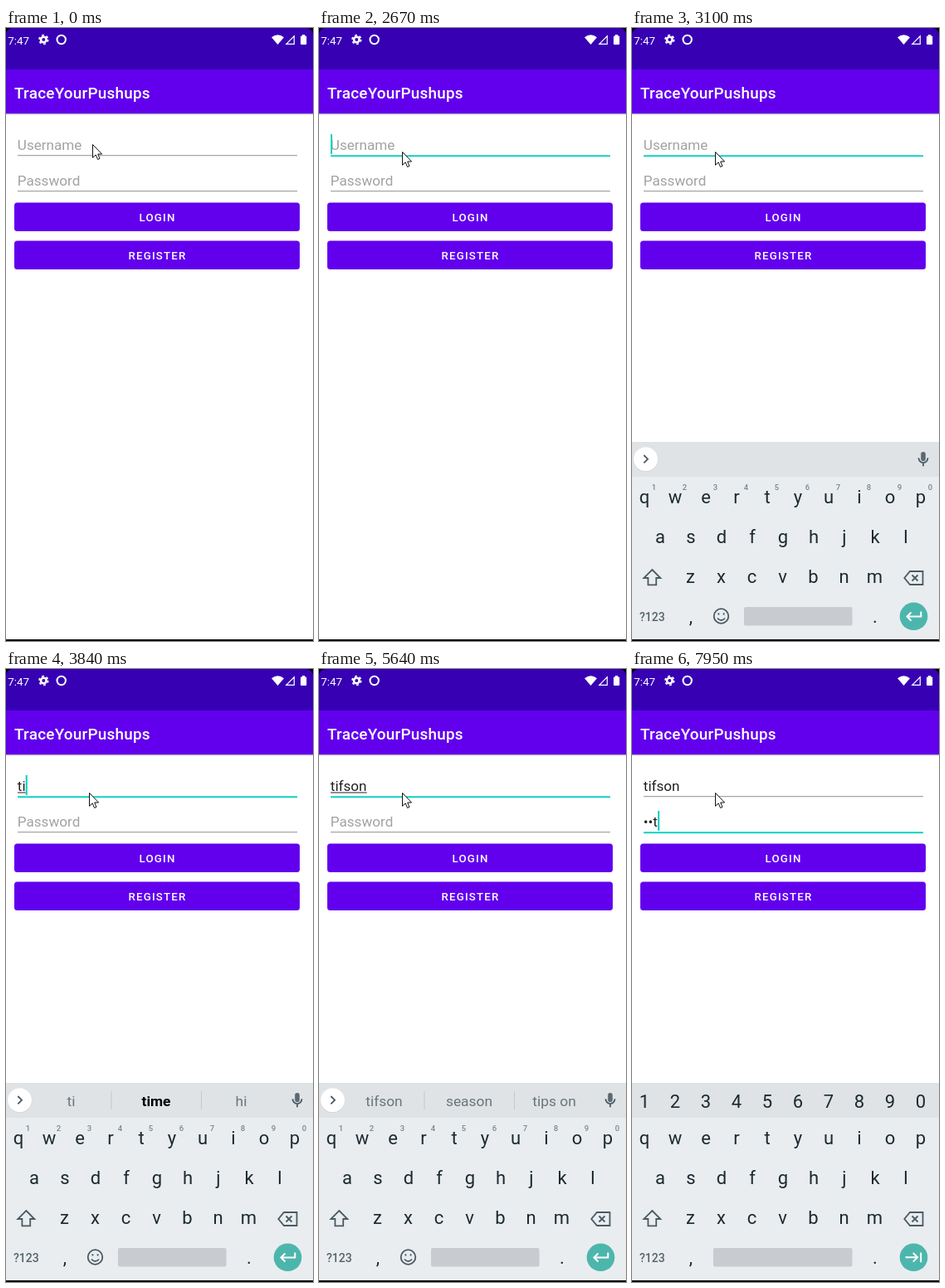
Recreate the animation shown at these times as an HTML page. Size 370 by 739 pixels, loop 8000 ms.

```html
<!DOCTYPE html>
<html lang="en">
<head>
<meta charset="utf-8">
<title>Login form</title>
<style>
  html, body { margin: 0; width: 100%; height: 100%; overflow: hidden; background: #fff; }
  svg { display: block; width: 370px; height: 739px; font-family: Roboto, sans-serif; }
  text { white-space: pre; font-variant-ligatures: none; }
  .mid { text-anchor: middle; }
  .title { font: 500 18.9px Roboto, sans-serif; letter-spacing: .0125em; fill: #fff; }
  .btn { font: 500 13.25px Roboto, sans-serif; letter-spacing: .0893em; fill: #fff; }
  .field { font-size: 17.1px; fill: #212121; }
  .hint { fill: #a2a2a2; }
  .key { font-size: 22px; fill: #1c2a30; }
  .small { font: 500 9.5px Roboto, sans-serif; fill: #7b868c; }
  .word { font-size: 17.4px; fill: #6a757b; }
  .word.bold { font-weight: 700; fill: #000; }
  .line { fill: none; stroke: #4a5a62; stroke-width: 1.8; }
  .white { fill: none; stroke: #fff; stroke-width: 2; }
</style>
</head>
<body>
<svg viewBox="0 0 370 739">
  <rect width="370" height="739" fill="#fff"/>
  <rect y="103" width="370" height="1" fill="#b4a8c4"/>
  <rect y="104" width="370" height="1" fill="#ececec"/>
  <rect width="370" height="50" fill="#3700b3"/>
  <rect y="50" width="370" height="53" fill="#6200ee"/>
  <path d="M0 0H8A8 8 0 0 0 0 8ZM370 0H362A8 8 0 0 1 370 8Z"/>

  <g fill="#fff">
    <text x="2.3" y="19.5" font-size="13.4">7:47</text>
    <path d="M320 11.3Q327.5 5.2 335 11.3L327.5 20Z"/>
    <rect x="355" y="9.5" width="7.2" height="10.5" rx="1"/>
    <rect x="357" y="8" width="3.2" height="2"/>
  </g>
  <g fill="none" stroke="#fff">
    <circle cx="45.3" cy="14" r="3.3" stroke-width="2.6"/>
    <circle cx="45.3" cy="14" r="5.3" stroke-width="1.8" stroke-dasharray="2.77"/>
    <circle cx="66.7" cy="14" r="5.2" stroke-width="2"/>
    <path d="M347.3 9.8V19.3H337.8Z" stroke-width="1.2"/>
  </g>

  <text class="title" x="10" y="84.5">TraceYourPushups</text>
  <g fill="#6200ee">
    <rect x="10" y="210.5" width="344" height="34.5" rx="3.5"/>
    <rect x="10" y="256.5" width="344" height="34.5" rx="3.5"/>
  </g>
  <text class="btn mid" x="182.5" y="233">LOGIN</text>
  <text class="btn mid" x="182.5" y="279">REGISTER</text>

  <g id="user"></g>
  <g id="pass"></g>
  <rect y="737" width="370" height="2"/>

  <g id="board">
    <rect y="499" width="370" height="238" fill="#e9edf0"/>
    <rect y="499" width="370" height="42" fill="#dfe3e6"/>
    <g id="keys"></g>
    <path class="line" d="M24.3 653L34.3 663H29.2V671.3H19.4V663H14.3Z"/>
    <path class="line" d="M335 655H350.5V671H335L328.3 663ZM337.5 659.5L344.5 666.5M344.5 659.5L337.5 666.5"/>
    <text x="9" y="714.5" font-size="14" font-weight="500" fill="#56646b">?123</text>
    <rect id="space" y="698" height="22.5" rx="2" fill="#c8ccd0"/>
    <circle cx="339.5" cy="709.3" r="16.8" fill="#4db6ac"/>
    <g id="textMode">
      <circle cx="16.5" cy="520.3" r="14.8" fill="#cfd3d6"/>
      <circle cx="16.5" cy="519.7" r="14.5" fill="#fff"/>
      <path class="line" d="M14.3 515L19 519.7L14.3 524.4"/>
      <g id="words"></g>
      <rect x="348.2" y="511" width="5.6" height="11" rx="2.8" fill="#5b6a72"/>
      <path class="line" stroke-width="1.5" d="M345.5 518.3a5.5 5.8 0 0 0 11 0M351 524V528.3"/>
      <circle class="line" cx="107.5" cy="709" r="8.8"/>
      <path class="line" d="M103 711.5Q107.5 716.5 112 711.5M104.4 705.2v2.4M110.6 705.2v2.4"/>
      <path class="white" d="M348.3 703.5V709.5H331.5M336.5 704.5L331.5 709.5L336.5 714.5"/>
    </g>
    <g id="passMode">
      <path class="white" d="M329.5 709.3H344M338.8 704L344.1 709.3L338.8 714.6M348.2 703.5V715.2"/>
    </g>
  </g>

  <path id="pointer" d="M.5 .5V16.3L4.2 12.9L6.6 18.5L9 17.4L6.7 12H11.6Z" fill="#fff" stroke="#111"/>
</svg>
<script>
const LOOP = 8000;
const $ = id => document.getElementById(id);
const label = (cls, x, y, s) => `<text class="${cls}" x="${x}" y="${y}">${s}</text>`;

// Each list holds [start time, value]; the latest started value applies.
const at = (list, t) => list.reduce((v, [start, next]) => t >= start ? next : v, null);

const pointer = [[0, [104, 140]], [1390, [104, 143]], [1540, [100, 149]]];
const userText = [[0, ''], [3400, 't'], [3690, 'ti'], [3990, 'tif'], [4290, 'tifs'],
  [4690, 'tifso'], [5060, 'tifson']];
const passText = [[0, ''], [7360, 'f'], [7800, '•i'], [7950, '••t']];
const focus = [[0, ''], [2280, 'user'], [6010, 'pass']];
const caret = [[0, false], [2400, true], [3100, false], [3400, true], [5640, false],
  [6010, true], [6470, false], [7060, true]];
const words = [[0, []], [3400, ['t', 'the', 'today']], [3840, ['ti', '*time', 'hi']],
  [3990, ['tif', 'if', 'tiff']], [4290, ['tifs', 'tiffs', 'tips']],
  [4690, ['tifso', 'tiffs', 'tiles']], [5060, ['tifson', 'season', 'tips on']]];
const board = [[0, null], [2980, [13, .85]], [3100, [0, 1]]];
const mode = [[0, 'text'], [6160, 'pass']];

function drawField(id, top, hint, text, focused, caretOn, composing) {
  const g = $(id), base = top + 19;
  const rule = focused
    ? `<rect x="14" y="${top + 25.3}" width="337" height="1.9" fill="#03cfc0"/>`
    : `<rect x="14" y="${top + 25.2}" width="337" height="1" fill="#8f8f8f"/>`;
  g.innerHTML = rule + label(text ? 'field' : 'field hint', 13.8, base, text || hint);
  const w = text ? g.querySelector('text').getComputedTextLength() : 0;
  let extra = '';
  if (composing && text) extra += `<rect x="14" y="${base + 1.5}" width="${w}" height="1" fill="#212121"/>`;
  if (focused && caretOn) extra += `<rect x="${14 + w}" y="${top}" width="2" height="24" fill="#03cfc0"/>`;
  g.insertAdjacentHTML('beforeend', extra);
}

function drawKeys(isPass) {
  const row = (s, x, y) => [...s].map((c, i) => label('key mid', x + i * 37, y, c)).join('');
  const digits = '1234567890';
  $('keys').innerHTML = row('qwertyuiop', 15, 572.5) + row('asdfghjkl', 34, 620.5) +
    row('zxcvbnm', 70.5, 668.5) + row(',', 71, 716.5) + row('.', 293, 716.5) +
    (isPass ? row(digits, 15, 528.5)
      : [...digits].map((c, i) => label('small mid', 26.5 + i * 37, 557, c)).join(''));
  $('space').setAttribute('x', isPass ? 98 : 135);
  $('space').setAttribute('width', isPass ? 167.5 : 130.5);
  $('textMode').style.display = isPass ? 'none' : '';
  $('passMode').style.display = isPass ? '' : 'none';
}

function drawWords(list) {
  const bars = [127, 235.5].map(x => `<rect x="${x - .5}" y="509" width="1" height="22" fill="#c3c8cb"/>`);
  $('words').innerHTML = !list.length ? '' : bars.join('') + list.map((s, i) =>
    label(s[0] === '*' ? 'word bold mid' : 'word mid', 78.5 + i * 102.5, 526.7, s.replace('*', ''))).join('');
}

let last;
function draw(t) {
  const s = { p: at(pointer, t), user: at(userText, t), pass: at(passText, t), focus: at(focus, t),
    caret: at(caret, t), words: at(words, t), board: at(board, t), mode: at(mode, t) };
  const state = JSON.stringify(s);
  if (state === last) return;
  last = state;
  drawField('user', 128, 'Username', s.user, s.focus === 'user', s.caret, s.focus === 'user');
  drawField('pass', 171, 'Password', s.pass, s.focus === 'pass', s.caret, false);
  $('pointer').setAttribute('transform', `translate(${s.p})`);
  $('board').style.display = s.board ? '' : 'none';
  if (!s.board) return;
  $('board').setAttribute('transform', `translate(0 ${s.board[0]})`);
  $('board').setAttribute('opacity', s.board[1]);
  drawKeys(s.mode === 'pass');
  drawWords(s.words);
}

const start = performance.now();
function tick() {
  draw((performance.now() - start) % LOOP);
  requestAnimationFrame(tick);
}
tick();
</script>
</body>
</html>
```
